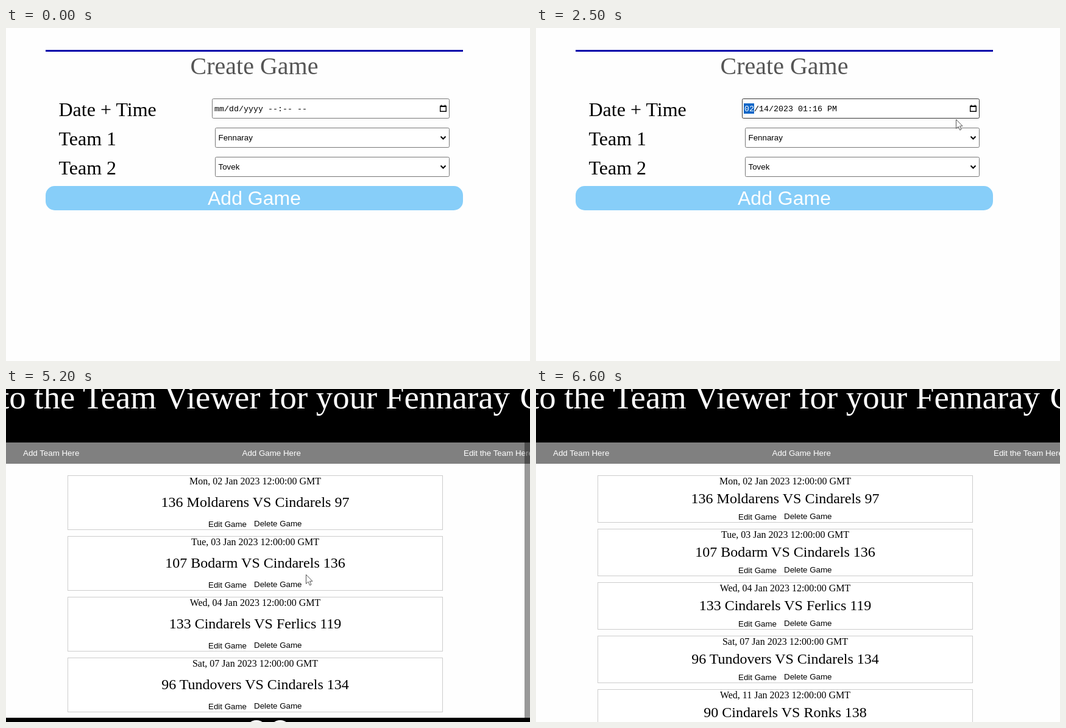
Write an HTML page that moves like this. It is 860x548 px and loops after 6.8 s.

```html
<!DOCTYPE html>
<html lang="en">
<head>
<meta charset="utf-8">
<title>Create Game</title>
<style>
html, body { margin: 0; width: 100%; height: 100%; overflow: hidden; background: #fefefe; }
svg { display: block; }
text { font-family: "Liberation Sans", Arial, sans-serif; font-size: 13.333px; white-space: pre; }
.serif { font-family: "Liberation Serif", "Times New Roman", serif; }
.mono { font-family: "Liberation Mono", "Courier New", monospace; }
.mid { text-anchor: middle; }
.label { font-size: 32px; }
.banner { font-size: 54.8px; }
.box { fill: #fff; stroke: #767676; }
.white { fill: #fff; }
</style>
</head>
<body>
<svg width="860" height="548" viewBox="0 0 860 548">
  <g id="form">
    <path d="M65 37.5H750" stroke="#0000aa" stroke-width="3"/>
    <text class="serif mid" x="407.5" y="76" style="font-size:40px" fill="#555">Create Game</text>
    <text class="serif label" x="86.5" y="145">Date + Time</text>
    <text class="serif label" x="86.5" y="193">Team 1</text>
    <text class="serif label" x="86.5" y="241">Team 2</text>

    <rect id="dateBox" class="box" x="338.5" y="116.5" width="389" height="32" rx="2"/>
    <rect id="mark" x="341" y="124" width="17" height="17" fill="#1067c8"/>
    <text class="mono" x="342" y="137"><tspan id="month"></tspan><tspan id="rest"></tspan></text>
    <path d="M712.7 128.5h9.6v8.8h-9.6zM712 129.3h11M714.5 126.5v2M720.5 126.5v2" fill="none" stroke="#000" stroke-width="1.4"/>

    <rect class="box" x="343.5" y="164.5" width="384" height="32" rx="2"/>
    <rect id="teamBox" class="box" x="343.5" y="212.5" width="384" height="32" rx="2"/>
    <path d="M713.5 178.5l4 4 4-4M713.5 226.5l4 4 4-4" fill="none" stroke="#000" stroke-width="2"/>
    <text x="348.5" y="185">Fennaray</text>
    <text id="team" x="348.5" y="233"></text>

    <rect x="65" y="260" width="685" height="40" rx="15" fill="#87cef9"/>
    <text class="mid label white" x="407.5" y="291">Add Game</text>
  </g>

  <g id="list">
    <g id="cards"></g>
    <rect width="860" height="88"/>
    <g class="white">
      <text class="serif banner" x="-10" y="32">to the Team Viewer for your Fennaray</text>
      <text class="serif banner" x="843.5" y="32">Cindarels</text>
    </g>
    <rect y="88" width="860" height="35" fill="#808080"/>
    <g class="white">
      <text x="28" y="110">Add Team Here</text>
      <text x="387.5" y="110">Add Game Here</text>
      <text x="751" y="110">Edit the Team Here</text>
    </g>
    <g id="footer">
      <rect x="851" y="88" width="9" height="453" fill="#000" opacity=".4"/>
      <rect y="541" width="860" height="7"/>
      <circle class="white" cx="411" cy="562" r="17"/>
      <circle class="white" cx="450" cy="562" r="17"/>
    </g>
  </g>

  <path id="cursor" d="M.5 .5V15.5L4 12.2L6.6 18L9 17L6.5 11.3H11z" fill="#fff" stroke="#555"/>
</svg>
<script>
const $ = id => document.getElementById(id);
const show = (id, on) => $(id).setAttribute("display", on ? "inline" : "none");
const put = (id, text) => { $(id).textContent = text; };

const LOOP = 6800;
const games = [
  ["Mon, 02", "136 Moldarens VS Cindarels 97"],
  ["Tue, 03", "107 Bodarm VS Cindarels 136"],
  ["Wed, 04", "133 Cindarels VS Ferlics 119"],
  ["Sat, 07", "96 Tundovers VS Cindarels 134"],
  ["Wed, 11", "90 Cindarels VS Ronks 138"]
];

// Cursor path: time, x, y
const path = [
  [100, 758, 200], [400, 732, 154], [700, 714, 130], [800, 712, 132], [1000, 689, 150],
  [2600, 689, 150], [3000, 640, 472], [3300, 545, 330], [3400, 525, 270], [3600, 503, 220],
  [3800, 500, 226], [4200, 500, 226], [4300, 491, 327], [4600, 489, 304], [4900, 488, 282],
  [5000, 488, 282], [5500, 499, 340], [5600, 499, 340], [6300, 520, 560]
];

function cursorAt(t) {
  const i = path.findIndex(p => p[0] > t);
  if (i < 1) return null;
  const [a, b] = [path[i - 1], path[i]];
  const k = (t - a[0]) / (b[0] - a[0]);
  return [a[1] + (b[1] - a[1]) * k, a[2] + (b[2] - a[2]) * k];
}

// Four cards share the page height; five fall back to their natural height.
function drawCards(count) {
  const spare = count < 5 ? 12 : 0;
  $("cards").innerHTML = games.slice(0, count).map(([day, score], i) => {
    const y = 142 + i * (88 + spare);
    return `<rect x="101.5" y="${y + .5}" width="615" height="${77 + spare}" fill="#fff" stroke="#ccc"/>
      <text class="serif mid" x="409" y="${y + 15}" style="font-size:16px">${day} Jan 2023 12:00:00 GMT</text>
      <text class="serif mid" x="409" y="${y + 46 + spare / 2}" style="font-size:24px">${score}</text>
      <text x="332" y="${y + 73 + spare}">Edit Game</text>
      <text x="407" y="${y + 72 + spare}">Delete Game</text>`;
  }).join("");
}

function drawForm(t) {
  const filled = t >= 1700, active = t >= 800 && t < 3000, focus = t >= 4000;
  put("month", filled ? "02" : "mm");
  put("rest", filled ? "/14/2023 01:16 PM" : "/dd/yyyy --:-- --");
  $("month").setAttribute("fill", active ? "#fff" : "#000");
  show("mark", active);
  $("dateBox").style.stroke = active ? "#333" : "";
  put("team", t >= 4300 ? "Kestun" : "Tovek");
  const box = $("teamBox").style;
  box.stroke = focus ? "#000" : t >= 3500 ? "#333" : "";
  box.strokeWidth = focus ? 2 : 1;
}

let shown = -1;
function frame(now) {
  const t = Math.floor(now % LOOP / 100) * 100;
  if (t !== shown) {
    shown = t;
    const onList = t >= 5000;
    show("form", !onList);
    show("list", onList);
    show("footer", t < 5700);
    if (onList) drawCards(t < 5700 ? 4 : 5);
    else drawForm(t);
    const at = cursorAt(t);
    show("cursor", at);
    if (at) $("cursor").setAttribute("transform", `translate(${at.map(Math.round)})`);
  }
  requestAnimationFrame(frame);
}
frame(0);
</script>
</body>
</html>
```
